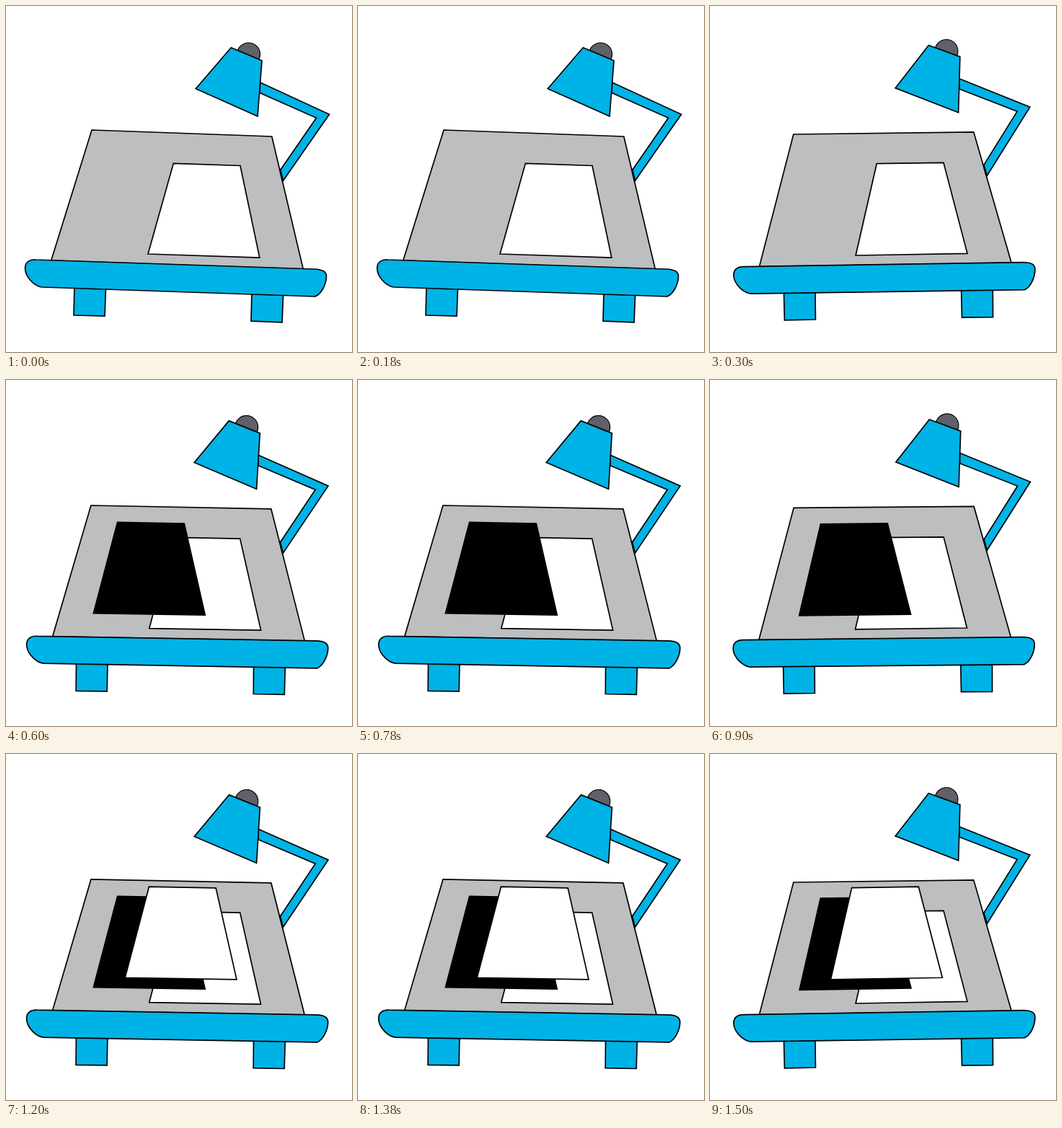
An HTML page that plays this animation: 480x480 px, repeating every 1.8 s.

```html
<!DOCTYPE html>
<html lang="en">
<head>
<meta charset="utf-8">
<title>Drawing desk</title>
<style>
  html, body { margin: 0; width: 100%; height: 100%; overflow: hidden; background: #fff; }
  svg { display: block; width: 100vw; height: 100vh; }
  #desk { stroke: #000; stroke-width: 1.7; stroke-linejoin: miter; }
  .blue { fill: #00b3e6; }
</style>
</head>
<body>
<svg viewBox="0 0 480 480">
  <defs>
    <path id="sheet" d="M232.3 218.3 L325 221.5 L351.8 349 L197 344 Z"/>
  </defs>
  <g id="desk">
    <!-- lamp -->
    <path class="blue" d="M352.5 106 L448.5 150.3 L384 243 L380 228.5 L430.5 155.3 L352 120.5 Z"/>
    <circle cx="336.5" cy="67" r="16" fill="#5f6068" stroke-width="1.2"/>
    <path class="blue" d="M312.3 57.8 L355 75.8 L349 153 L263.3 114.8 Z"/>
    <!-- board -->
    <path fill="#bdbec0" d="M119 172 L368.8 181 L412.3 365 L62.7 353 Z"/>
    <path d="M380 226 L384 243" stroke-width="2.6"/>
    <use href="#sheet" fill="#fff"/>
    <use id="black" href="#sheet" x="-77" y="-22.3" fill="#000"/>
    <use id="white" href="#sheet" x="-33" y="-34.8" fill="#fff"/>
    <!-- legs and front rail -->
    <path class="blue" d="M95 388 L138.5 390 L137 430.2 L94 429 Z"/>
    <path class="blue" d="M341 397 L384.7 399 L383 438.8 L340 437.2 Z"/>
    <path class="blue" d="M41 352 L428 365 C440 365.5 445 369 444.5 376
      C444 386 438 399 429 403 L50 390 C40 389 27 377 26.5 364 C26.5 355 33 351.5 41 352 Z"/>
  </g>
</svg>
<script>
  const STEP = 300;
  const tilts = [0, -2.8, -0.95, -2.5, -0.92, -2.8];
  const byId = id => document.getElementById(id);
  const show = (id, on) => byId(id).setAttribute('visibility', on ? 'visible' : 'hidden');
  const start = performance.now();

  function draw(now) {
    const pose = Math.floor(Math.max(0, now - start) / STEP) % tilts.length;
    byId('desk').setAttribute('transform', `rotate(${tilts[pose]} 240 240)`);
    show('black', pose >= 2);
    show('white', pose >= 4);
    requestAnimationFrame(draw);
  }
  draw(start);
</script>
</body>
</html>
```
